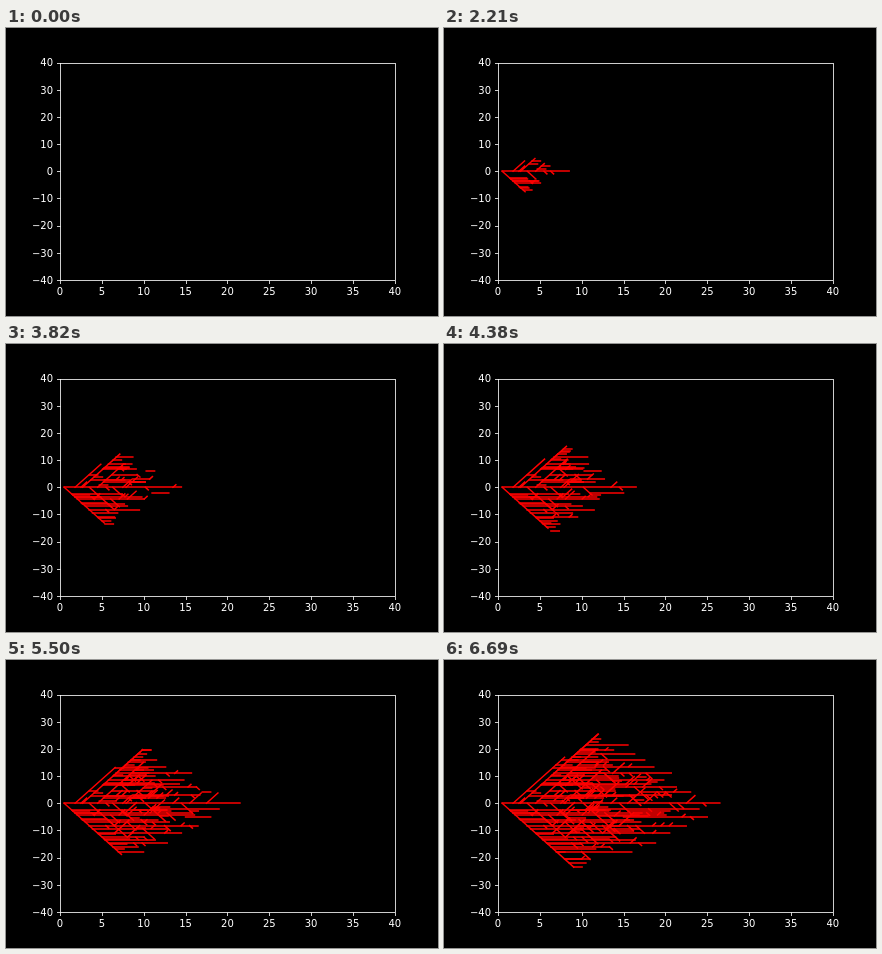
Write an HTML page with a canvas that moves like this. It is 432 by 288 pixels and loops after 6760 ms.

```html
<!DOCTYPE html>
<html lang="en">
<head>
<meta charset="utf-8">
<title>Branching growth</title>
<style>
  html, body { margin: 0; height: 100%; overflow: hidden; background: #000; }
  canvas { display: block; width: 432px; height: 288px; }
</style>
</head>
<body>
<canvas id="plot" width="432" height="288"></canvas>
<script>
const ctx = document.getElementById('plot').getContext('2d');
const LOOP = 6760, TICK = 69, LAST = 97;
const DX = 0.342, DY = 0.94; // unit step at 70 degrees
const SLOPE = DX / DY;
const px = x => 54 + 8.37 * x;
const py = y => 143.28 - 2.718 * y;

let seed = 20;
function rnd() {
  seed = (seed * 16807) % 2147483647;
  return seed / 2147483647;
}

// dir: 0 right, 1 up-right, -1 down-right
const runs = [];
function add(x, y, dir, start, len, speed = len / (LAST - start)) {
  const run = { x, y, dir, start, len, speed };
  runs.push(run);
  return run;
}
const pointAt = (run, n) => [
  run.x + n * (run.dir ? DX : 1),
  run.y + n * run.dir * DY
];

// Long spines: centre, lower edge, upper edges and inner diagonals
[
  [0.5, 0, 0, 1, 26], [0.5, 0, -1, 1, 25.8],
  [1.8, 0, 1, 10, 18.7], [2.7, 0, 1, 14, 27.4], [4.5, 0, 1, 21, 21],
  [6.3, 0, -1, 28, 8], [7.9, 0, 1, 34, 13],
  [4.7, 1, 0, 25, 3.5], [5.3, 2.6, 0, 36, 11], [8.7, 3, 0, 42, 12],
  [10.3, 6, 0, 54, 11.5], [17, 4.2, 0, 73, 6.8],
  [11, -2, 0, 47, 13.5], [15, -5, 0, 68, 10],
  [10.2, 0, -1, 46, 11], [6.5, 10.4, 1, 56, 16.4]
].forEach(r => add(...r));

// Rows leaving the upper edge: height, start, right end
[
  [7, 40, 19], [8.5, 45, 20.5], [10, 48, 14.5], [11, 47, 21.6],
  [13.5, 61, 19.3], [16, 69, 17.8], [18.2, 74, 17], [19.5, 77, 14.5],
  [21.5, 81, 16]
].forEach(([y, start, end]) => {
  const x = 2.7 + SLOPE * y;
  add(x, y, 0, start, end - x);
});

// Rows leaving the lower edge: depth, start, right end
[
  [2.5, 14, 14], [3.5, 17, 20], [4.3, 17, 21], [6, 27, 16], [7, 31, 18],
  [8.2, 33, 22.5], [9.3, 38, 17], [11, 47, 20.8], [12.5, 52, 15],
  [13.4, 55, 17], [14.6, 58, 19.5], [16, 63, 14], [17.8, 70, 16],
  [20.5, 85, 11.3], [22, 88, 11.2]
].forEach(([d, start, end]) => {
  const x = 0.5 + SLOPE * d;
  add(x, -d, 0, start, end - x);
});

function sprout(run, chance, maxLen) {
  for (let n = 2; n < run.len; n++) {
    if (rnd() > chance) continue;
    const start = run.start + n / run.speed + rnd() * 9;
    const dir = run.dir ? 0 : rnd() < 0.5 ? 1 : -1;
    const len = 1 + Math.floor(rnd() * maxLen);
    const speed = 0.2 + rnd() * 0.1;
    if (start < LAST) add(...pointAt(run, n), dir, start, len, speed);
  }
}
const spines = runs.slice();
spines.forEach(run => sprout(run, 0.42, 6));
runs.slice(spines.length).forEach(run => sprout(run, 0.28, 5));

function line(x1, y1, x2, y2) {
  ctx.beginPath();
  ctx.moveTo(x1, y1);
  ctx.lineTo(x2, y2);
  ctx.stroke();
}

function drawRuns(tick) {
  ctx.strokeStyle = '#f00';
  ctx.lineWidth = 1.5;
  ctx.lineCap = 'square';
  for (const run of runs) {
    if (tick < run.start) continue;
    const grown = Math.floor(run.speed * (tick - run.start) + 1e-6);
    const [x, y] = pointAt(run, Math.min(run.len, Math.max(1, grown)));
    const snap = run.dir ? py : v => Math.round(py(v));
    line(px(run.x), snap(run.y), px(x), snap(y));
  }
}

function drawAxes() {
  ctx.strokeStyle = ctx.fillStyle = '#fff';
  ctx.lineWidth = 0.8;
  ctx.lineCap = 'butt';
  ctx.font = '10px "DejaVu Sans", sans-serif';
  ctx.strokeRect(54.5, 35.5, 335, 217);
  ctx.textAlign = 'center';
  for (let v = 0; v <= 40; v += 5) {
    const x = Math.round(px(v)) + 0.5;
    line(x, 252.5, x, 256);
    ctx.fillText(v, px(v), 267);
  }
  ctx.textAlign = 'right';
  for (let v = -40; v <= 40; v += 10) {
    const y = Math.round(py(v)) + 0.5;
    line(51, y, 54.5, y);
    ctx.fillText(String(v).replace('-', '\u2212'), 47, py(v) + 3.8);
  }
}

function draw() {
  const ms = performance.now() % LOOP;
  ctx.fillStyle = '#000';
  ctx.fillRect(0, 0, 432, 288);
  drawRuns(Math.min(LAST, Math.floor(ms / TICK + 0.2)));
  drawAxes();
  requestAnimationFrame(draw);
}
draw();
</script>
</body>
</html>
```
